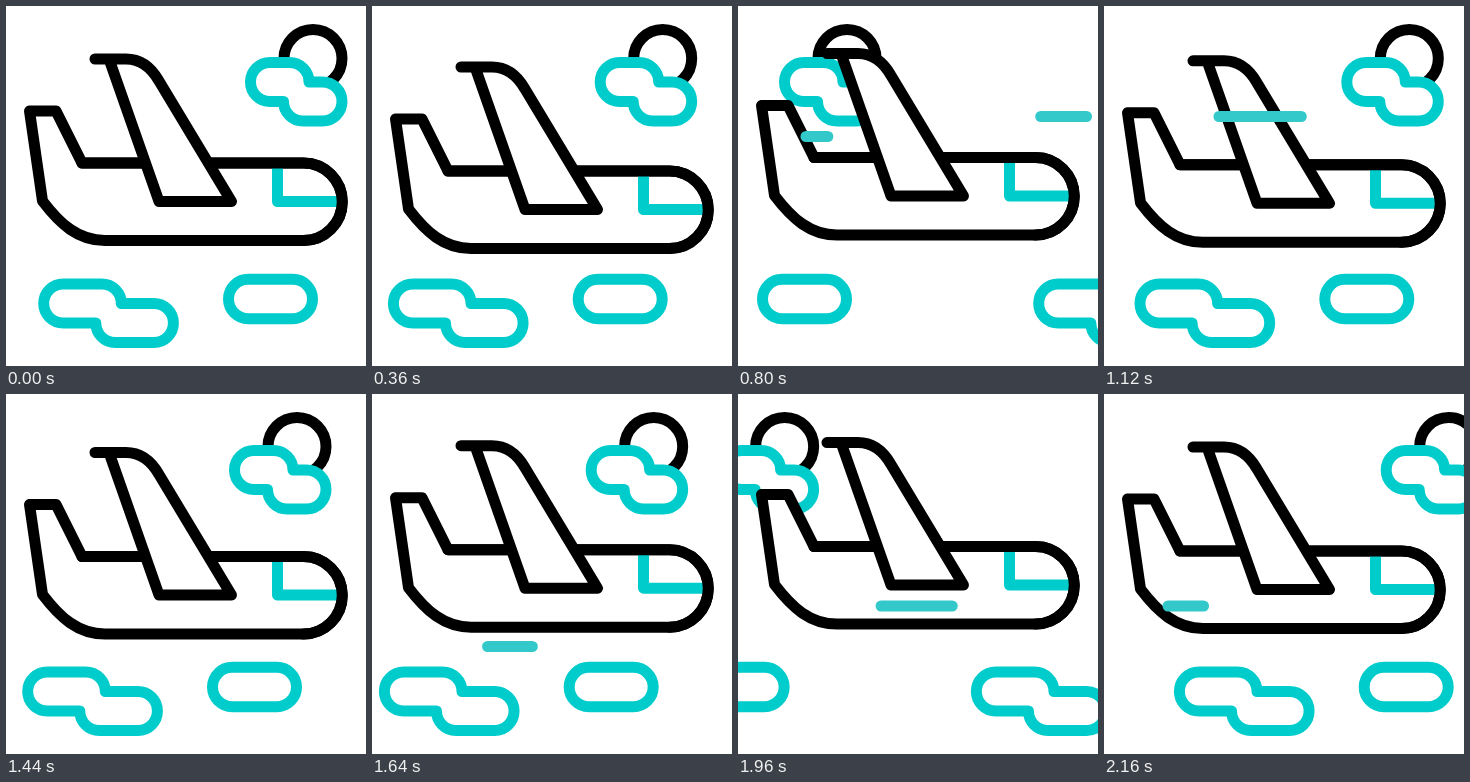
Animation, 360 px wide and 360 px high, one loop 2200 ms. Source, as an HTML page:

```html
<!DOCTYPE html>
<html lang="en">
<head>
<meta charset="utf-8">
<title>Airplane</title>
<style>
  html, body { margin: 0; width: 100%; height: 100%; overflow: hidden; background: #fff; }
  svg { display: block; width: 100%; height: 100%; }
  .ink, .teal { fill: #fff; stroke: #000; stroke-width: 11; stroke-linecap: round; stroke-linejoin: round; }
  .teal { stroke: #00cccc; }
  .streak { stroke: #33c9cb; stroke-width: 11; stroke-linecap: round; }
</style>
</head>
<body>
<svg viewBox="0 0 360 360">
  <defs>
    <g id="sky">
      <circle class="ink" cx="307" cy="52.5" r="29"/>
      <path class="teal" id="highCloud"/>
      <path class="teal" id="lowCloud"/>
      <rect class="teal" x="222.5" y="273.3" width="84" height="39.4" rx="19.7"/>
    </g>
  </defs>
  <use href="#sky" id="skyNear"/>
  <use href="#sky" id="skyNext"/>
  <g id="plane">
    <path id="body" class="ink" d="M23.5 105H50L76 157H297.5A38.75 38.75 0 0 1 297.5 234.5H99C72 234.5 54 218 36.5 195Z"/>
    <path class="teal" d="M271.5 158V195.5H331" style="fill:none"/>
    <path class="ink" d="M297.5 157A38.75 38.75 0 0 1 297.5 234.5M76 157H297.5" style="fill:none"/>
    <path class="ink" d="M89 53H120C134 53 145 61 153 75L225.5 195.5H153L103 53"/>
  </g>
  <g id="streaks"></g>
</svg>
<script>
const LOOP = 2200, STEP = 40, SPAN = 461;
const byId = id => document.getElementById(id);

// Two-lobed cloud outline; w is the straight part of each lobe.
function cloud(x, y, w, r = 19.5) {
  const arc = (dx, dy) => `a${r} ${r} 0 0 1 ${dx} ${dy}`;
  const ledge = w - 6;
  return `M${x} ${y}h${w}${arc(r, r)}h${ledge}${arc(0, 2 * r)}h${-w}${arc(-r, -r)}h${-ledge}${arc(0, -2 * r)}z`;
}
byId('highCloud').setAttribute('d', cloud(264, 56.5, 19.5));
byId('lowCloud').setAttribute('d', cloud(57.2, 278, 38.6));

// Slow drift, then a fast sweep that wraps round; played twice per loop.
const drift = [[0, 0], [603, -27.3], [800, -198], [1082, -461], [1440, -477], [1676, -488], [1800, -591], [2160, -884.3], [2200, -922]];
const bob = [[0, 0], [360, 8], [800, -5.5], [1120, 1.8], [1440, 5.5], [1800, -6], [2160, 0]];

const streaks = [
  { y: 130.5, from: 268, to: 68, head: [370, 720], tail: [490, 838] },
  { y: 110.5, from: 348.5, to: 105, head: [722, 1137], tail: [853, 1283] },
  { y: 252.5, from: 227, to: 27, head: [1445, 1795], tail: [1530, 1860] },
  { y: 212, from: 306, to: 64, head: [1692, 2090], tail: [1800, 2222] }
];
for (const s of streaks) {
  s.line = document.createElementNS('http://www.w3.org/2000/svg', 'line');
  s.line.setAttribute('class', 'streak');
  s.line.setAttribute('y1', s.y);
  s.line.setAttribute('y2', s.y);
  byId('streaks').append(s.line);
}

const progress = (t, [a, b]) => Math.min(1, Math.max(0, (t - a) / (b - a)));

function linear(keys, t) {
  const i = keys.findIndex(k => k[0] > t);
  const [a, b] = [keys[i - 1], keys[i]];
  return a[1] + (b[1] - a[1]) * progress(t, [a[0], b[0]]);
}

// Periodic cubic curve through the keys.
function smooth(keys, t) {
  const n = keys.length;
  const key = i => {
    const turn = Math.floor(i / n), [time, value] = keys[i - turn * n];
    return [time + turn * LOOP, value];
  };
  const slope = i => {
    const a = key(i - 1), b = key(i + 1);
    return (b[1] - a[1]) / (b[0] - a[0]);
  };
  let i = 0;
  while (key(i + 1)[0] <= t) i++;
  const a = key(i), b = key(i + 1), d = b[0] - a[0], u = (t - a[0]) / d, v = 1 - u;
  return v * v * ((1 + 2 * u) * a[1] + u * d * slope(i)) +
         u * u * ((1 + 2 * v) * b[1] - v * d * slope(i + 1));
}

function draw(t) {
  const x = linear(drift, t) % SPAN;
  byId('skyNear').setAttribute('x', x);
  byId('skyNext').setAttribute('x', x + SPAN);
  byId('plane').setAttribute('transform', `translate(0 ${smooth(bob, t)})`);
  for (const { line, from, to, head, tail } of streaks) {
    const at = range => from + (to - from) * progress(t, range);
    line.setAttribute('x1', at(head));
    line.setAttribute('x2', at(tail));
    line.setAttribute('visibility', t > head[0] && t < tail[1] ? 'visible' : 'hidden');
  }
}

const start = performance.now();
function tick() {
  const t = Math.max(0, performance.now() - start) % LOOP;
  draw(Math.floor(t / STEP) * STEP);
  requestAnimationFrame(tick);
}
tick();
</script>
</body>
</html>
```
